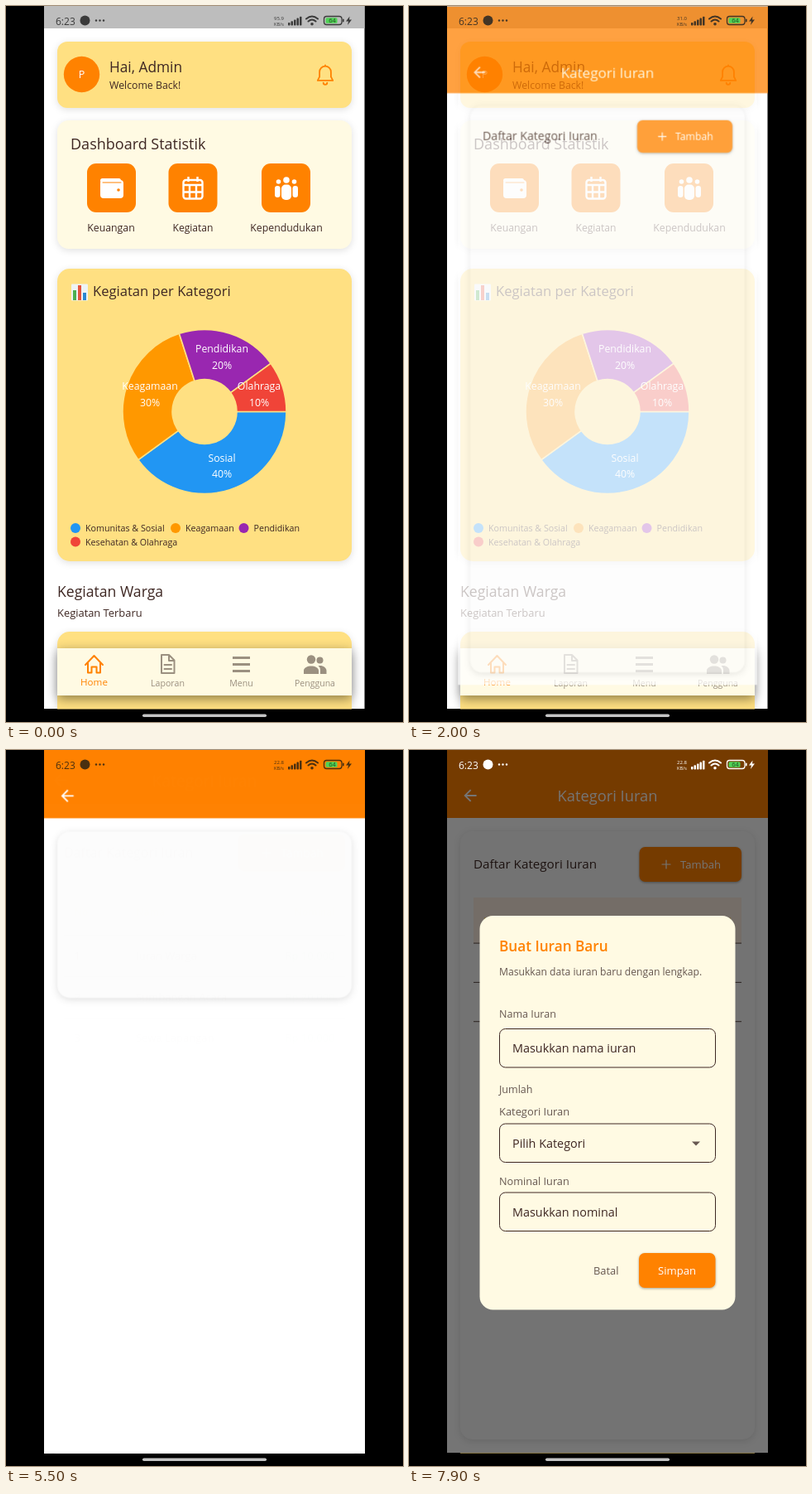
An HTML page that plays this animation: 480x864 px, repeating every 8000 ms.

```html
<!DOCTYPE html>
<html lang="id">
<head>
<meta charset="utf-8">
<title>Kategori Iuran</title>
<style>
html, body { margin: 0; width: 100%; height: 100%; overflow: hidden; background: #000; }
svg { display: block; width: 480px; height: 864px; font-family: "Open Sans", "Noto Sans", sans-serif; }
.soft { filter: drop-shadow(0 2px 4px rgba(0,0,0,.12)); }
.lift { filter: drop-shadow(0 1px 1.5px rgba(0,0,0,.35)); }
.deep { filter: drop-shadow(0 4px 7px rgba(0,0,0,.45)); }
.anim { animation: 8s linear infinite both; }
.zoom { transform-origin: 240px 424px; }

#menuScrim { animation-name: menuScrim; }
#sheet { animation-name: sheet; }
#list { animation-name: list; }
#rows { animation-name: rows; }
#press1 { animation-name: press1; }
#press3 { animation-name: press3; }
#detail { animation-name: detail; }
#dialogScrim { animation-name: dialogScrim; }
#dialog { animation-name: dialog; }
#status { animation-name: status; }
#rate0 { animation-name: rate0; }
#rate1 { animation-name: rate1; }
#rate2 { animation-name: rate2; }

@keyframes menuScrim {
  0%, 2.5% { opacity: 0; }
  6.5%, 19.4% { opacity: .28; }
  23%, 100% { opacity: 0; }
}
@keyframes sheet {
  0%, 2.5% { transform: translateY(660px); animation-timing-function: cubic-bezier(0,0,.2,1); }
  8.85%, 19.4% { transform: none; animation-timing-function: cubic-bezier(.4,0,1,1); }
  23%, 100% { transform: translateY(660px); }
}
@keyframes list {
  0%, 23.75% { opacity: 0; transform: scale(.85); animation-timing-function: ease-out; }
  26% { opacity: 1; transform: scale(.96); animation-timing-function: ease-out; }
  29.5%, 65% { opacity: 1; transform: scale(1); animation-timing-function: ease-out; }
  69%, 78% { opacity: 1; transform: scale(1.05); animation-timing-function: ease-out; }
  80% { opacity: 1; transform: scale(1.0127); animation-timing-function: ease-out; }
  83%, 100% { opacity: 1; transform: scale(1); }
}
@keyframes rows { 0%, 34% { opacity: 0; } 37.5%, 100% { opacity: 1; } }
@keyframes press1 {
  0%, 62.5% { opacity: 0; }
  64.5%, 81% { opacity: 1; }
  86%, 100% { opacity: 0; }
}
@keyframes press3 {
  0%, 49.5% { opacity: 0; }
  52%, 55% { opacity: 1; }
  58%, 100% { opacity: 0; }
}
@keyframes detail {
  0%, 65% { opacity: 0; transform: scale(.85); animation-timing-function: ease-out; }
  69%, 78% { opacity: 1; transform: scale(1); animation-timing-function: ease-out; }
  79.6%, 100% { opacity: 0; transform: scale(.94); }
}
@keyframes dialogScrim { 0%, 91.5% { opacity: 0; } 95.5%, 100% { opacity: .54; } }
@keyframes dialog { 0%, 92% { opacity: 0; } 95.5%, 100% { opacity: 1; } }
@keyframes status {
  0%, 24% { color: #3b3b3b; }
  26%, 92% { color: #4b3010; }
  95%, 100% { color: #fff; }
}
@keyframes rate0 { 0%, 3.7% { opacity: 1; } 3.71%, 100% { opacity: 0; } }
@keyframes rate1 { 0%, 3.7% { opacity: 0; } 3.71%, 52.4% { opacity: 1; } 52.41%, 100% { opacity: 0; } }
@keyframes rate2 { 0%, 52.4% { opacity: 0; } 52.41%, 100% { opacity: 1; } }
</style>
</head>
<body>
<svg id="stage" viewBox="0 0 480 864"></svg>
<script>
const ORANGE = '#ff8200', GOLD = '#ffe082', CREAM = '#fffae3', BROWN = '#3e2723', GREEN = '#2f8f36';

const text = (x, y, size, str, fill = BROWN, anchor = 'start', more = '') =>
  `<text x="${x}" y="${y}" font-size="${size}" fill="${fill}" text-anchor="${anchor}" ${more}>${str.replace('&', '&amp;')}</text>`;
const mid = (x, y, size, str, fill) => text(x, y, size, str, fill, 'middle');
const rect = (x, y, w, h, r, fill, more = '') =>
  `<rect x="${x}" y="${y}" width="${w}" height="${h}" rx="${r}" fill="${fill}" ${more}/>`;
const dot = (x, y, r, fill) => `<circle cx="${x}" cy="${y}" r="${r}" fill="${fill}"/>`;
// Icons live on a 24-unit grid centred on (x, y).
const icon = (x, y, s, body, fill = ORANGE) =>
  `<g transform="translate(${x - 12 * s} ${y - 12 * s}) scale(${s})" fill="${fill}">${body}</g>`;
const path = (d, more = '') => `<path d="${d}" ${more}/>`;
const line = (d, color, w) =>
  path(d, `fill="none" stroke="${color}" stroke-width="${w}" stroke-linecap="round" stroke-linejoin="round"`);
const layer = (id, body, cls = '') => `<g id="${id}" class="anim ${cls}">${body}</g>`;
const soft = 'class="soft"', lift = 'class="lift"';

const addPerson = path('M13 8c0-2.21-1.79-4-4-4S5 5.79 5 8s1.79 4 4 4 4-1.79 4-4zm2 2v2h3v3h2v-3h3v-2h-3V7h-2v3h-3zM1 18v2h16v-2c0-2.66-5.33-4-8-4s-8 1.34-8 4z');
const icons = {
  grid: path('M3 13h8V3H3v10zm0 8h8v-6H3v6zm10 0h8V11h-8v10zm0-18v6h8V3h-8z'),
  note: path('M17 10H7v2h10v-2zm2-7h-1V1h-2v2H8V1H6v2H5c-1.1 0-2 .9-2 2v14c0 1.1.9 2 2 2h14c1.1 0 2-.9 2-2V5c0-1.1-.9-2-2-2zm0 16H5V8h14v11zm-5-5H7v2h7v-2z'),
  houses: path('M1 11v10h5v-6h4v6h5V11L8 6zM10 3v2l7 5v1h2v2h-2v2h2v2h-2v4h6V3H10zm9 6h-2V7h2v2z'),
  purse: path('M21 18v1c0 1.1-.9 2-2 2H5c-1.1 0-2-.9-2-2V5c0-1.1.9-2 2-2h14c1.1 0 2 .9 2 2v1h-9c-1.1 0-2 .9-2 2v8c0 1.1.9 2 2 2h9zm-9-2h10V8H12v8zm4-2.5c-.83 0-1.5-.67-1.5-1.5s.67-1.5 1.5-1.5 1.5.67 1.5 1.5-.67 1.5-1.5 1.5z'),
  coin: dot(12, 12, 10, ORANGE) +
    line('M15.4 9.2C15.2 7.7 14 6.7 12 6.7 10 6.7 8.7 7.7 8.7 9.2 8.7 12.6 15.6 11.1 15.6 14.8 15.6 16.4 14.2 17.4 12 17.4 9.8 17.4 8.5 16.3 8.3 14.7M12 4.8V6.5M12 17.6V19.2', CREAM, 2),
  chart: path('M19 3H5c-1.1 0-2 .9-2 2v14c0 1.1.9 2 2 2h14c1.1 0 2-.9 2-2V5c0-1.1-.9-2-2-2zM9 17H7v-7h2v7zm4 0h-2V7h2v10zm4 0h-2v-4h2v4z'),
  horn: path('M18 11v2h4v-2zM16 17.6l3.2 2.4 1.2-1.6-3.2-2.4zM20.4 5.6 19.2 4 16 6.4 17.2 8zM4 9c-1.1 0-2 .9-2 2v2c0 1.1.9 2 2 2h1v4h2v-4h1l5 3V6L8 9zm11.5 3c0-1.33-.58-2.53-1.5-3.35v6.69c.92-.81 1.5-2 1.5-3.34z'),
  bubble: path('M20 2H4c-1.1 0-2 .9-2 2v18l4-4h14c1.1 0 2-.9 2-2V4c0-1.1-.9-2-2-2z'),
  addPerson,
  accounts: path('M4 6H2v14c0 1.1.9 2 2 2h14v-2H4V6zm16-4H8c-1.1 0-2 .9-2 2v12c0 1.1.9 2 2 2h12c1.1 0 2-.9 2-2V4c0-1.1-.9-2-2-2zm-6 2c1.66 0 3 1.34 3 3s-1.34 3-3 3-3-1.34-3-3 1.34-3 3-3zm6 12H8v-1.5c0-2 4-3 6-3s6 1 6 3V16z'),
  history: path('M13 3c-4.97 0-9 4.03-9 9H1l3.9 4L9 12H6c0-3.87 3.13-7 7-7s7 3.13 7 7-3.13 7-7 7c-1.93 0-3.68-.79-4.94-2.06l-1.42 1.42C8.27 20 10.51 21 13 21c4.97 0 9-4.03 9-9s-4.03-9-9-9zm-1 5v5l4.28 2.54.72-1.21-3.5-2.08V8H12z'),
  manage: dot(10, 8, 4, ORANGE) +
    path('M10.7 13C7.8 12.9 5.3 13.7 3.4 14.8 2.5 15.3 2 16.3 2 17.4V20h9.3C9.7 17.8 9.6 15.2 10.7 13z') +
    `<g fill="none" stroke="${ORANGE}"><circle cx="17" cy="16" r="2.8" stroke-width="2"/><circle cx="17" cy="16" r="4.3" stroke-width="1.6" stroke-dasharray="2.2 2.3"/></g>`,
  card: rect(2, 4, 20, 16, 3.5, ORANGE) + line('M3.5 8.2H20.5', CREAM, 1.2) +
    line('M3 11.2H8.5C10 14 13 14.6 15 13.2L21 10.6', CREAM, 1.2),
};

function home() {
  const slice = (from, to, fill) => {
    const at = (deg, r) => {
      const a = deg * Math.PI / 180;
      return `${240 + r * Math.cos(a)} ${489.5 + r * Math.sin(a)}`;
    };
    return path(`M${at(from, 99)}A99 99 0 0 1 ${at(to, 99)}L${at(to, 39)}A39 39 0 0 0 ${at(from, 39)}Z`,
      `fill="${fill}" stroke="${GOLD}" stroke-width="1.6"`);
  };
  const blue = '#2196f3', amber = '#ff9800', purple = '#9927b0', red = '#f04438', grey = '#9b9080';
  const label = (x, y, name, pct) => mid(x, y, 12.3, name, '#fff') + mid(x, y + 19.7, 12.3, pct, '#fff');
  const key = (x, y, name, fill) => dot(x, y, 6, fill) + text(x + 12, y + 4, 10.7, name);
  const person = (x, y, h) => dot(x, y, h, '#fff');
  return rect(46, 0, 388, 848, 0, '#fff') + rect(46, 0, 388, 27, 0, '#bdbdbd')
    + rect(62, 43, 356, 80, 12, GOLD, soft) + dot(91.5, 82.5, 21.7, ORANGE) + mid(91.5, 87, 12.5, 'P', '#fff')
    + text(125, 80, 17.3, 'Hai, Admin') + text(125, 100, 12.3, 'Welcome Back!')
    + icon(386, 83, 1.15, line('M12 3a6 6 0 0 0-6 6v5l-2 4h16l-2-4V9a6 6 0 0 0-6-6zM12 2V3M10 20.3a2 2 0 0 0 4 0', ORANGE, 1.6))
    + rect(62, 138, 356, 155, 14, CREAM, soft) + text(78, 173, 18, 'Dashboard Statistik')
    + [98, 196.5, 309].map(x => rect(x, 190, 59, 59, 11, ORANGE)).join('')
    + rect(114, 208, 25, 5, 2.5, '#fff') + rect(114, 210, 28, 22, 4, '#fff') + line('M117 213H139', ORANGE, 1) + dot(136, 222, 1.8, ORANGE)
    + `<g fill="none" stroke="#fff" stroke-width="2.4">${rect(214.5, 210, 23, 22.5, 3, 'none')}<path d="M214 216H238M214 224.5H238M222 216V232M230 216V232M220.5 206V212M231.5 206V212"/></g>`
    + person(339, 210, 3.8) + person(329.5, 212, 2.8) + person(348.5, 212, 2.8)
    + rect(333, 215.5, 12, 18.5, 5, '#fff') + rect(325, 217, 6.5, 14, 3.2, '#fff') + rect(346.5, 217, 6.5, 14, 3.2, '#fff')
    + mid(127, 272, 12.3, 'Keuangan') + mid(226, 272, 12.1, 'Kegiatan') + mid(339, 272, 12.3, 'Kependudukan')
    + rect(62, 317, 356, 353, 15, GOLD, soft)
    + rect(79, 335.5, 20, 20, 1, '#eef3f5') + rect(81, 343, 4, 12, 0, '#4caf50') + rect(87, 337, 4, 18, 0, '#e5533d') + rect(93, 346, 4, 9, 0, '#2b87d1')
    + text(105, 350, 16.6, 'Kegiatan per Kategori')
    + slice(0, 144, blue) + slice(144, 252, amber) + slice(252, 324, purple) + slice(324, 360, red)
    + label(261, 549.5, 'Sosial', '40%') + label(174, 463, 'Keagamaan', '30%')
    + label(261, 418.3, 'Pendidikan', '20%') + label(306, 463, 'Olahraga', '10%')
    + key(84, 630, 'Komunitas & Sosial', blue) + key(205, 630, 'Keagamaan', amber)
    + key(287.5, 630, 'Pendidikan', purple) + key(84, 646.5, 'Kesehatan & Olahraga', red)
    + text(62, 713, 17.6, 'Kegiatan Warga') + text(62, 737, 12.9, 'Kegiatan Terbaru')
    + rect(62, 755, 356, 120, 15, GOLD, soft) + rect(62, 775, 356, 57, 0, CREAM, 'class="deep"')
    + line('M96 795 106.500 784 117 795M99 793V804.500H103.500V797.500H109.500V804.500H114V793', ORANGE, 2)
    + line('M188 783H197L203.500 789.500V805H188ZM197 783V790H203M191.500 795H200M191.500 800H200', grey, 2)
    + path('M274 786.500H295M274 794.500H295M274 802.500H295', `stroke="${grey}" stroke-width="2.800"`)
    + dot(369, 788.5, 5.2, grey) + dot(379.5, 789.5, 4, grey)
    + path('M360 806V802C360 794.500 378 794.500 378 802V806ZM380 806V801.500C380 799 379 797.500 377.500 796.300 382 795 387.500 798 387.500 802V806Z', `fill="${grey}"`)
    + mid(106.5, 820, 11.6, 'Home', ORANGE) + mid(195.5, 821, 10.6, 'Laporan', grey)
    + mid(284.5, 821, 10.6, 'Menu', grey) + mid(373.5, 821, 10.5, 'Pengguna', grey);
}

function sheet() {
  const items = [
    ['grid', 'Dashboard'], ['note', 'Kegiatan'], ['houses', 'Data Warga &', 'Rumah'],
    ['purse', 'Pemasukan'], ['coin', 'Pengeluaran'], ['chart', 'Laporan', 'Keuangan'],
    ['horn', 'Broadcast'], ['bubble', 'Pesan Warga'], ['addPerson', 'Penerimaan', 'Warga'],
    ['accounts', 'Mutasi Keluarga'], ['history', 'Log Aktifitas'], ['manage', 'Manajemen', 'Pengguna'],
    ['card', 'Channel', 'Transfer'], ['addPerson', 'Aspirasi'],
  ];
  const tiles = items.map(([name, first, second], i) => {
    const x = 81.5 + i % 3 * 111, y = 210.5 + Math.floor(i / 3) * 121.4, cx = x + 47.7;
    const up = second ? 9.5 : 0;
    return rect(x, y, 95.5, 105.5, 11, CREAM, soft) + icon(cx, y + 37 - up, 1.5, icons[name])
      + mid(cx, y + 80.8 - up, 12.3, first) + (second ? mid(cx, y + 90.8, 12.3, second) : '');
  });
  return rect(62, 190.5, 356, 630.5, 22, '#fff') + tiles.join('');
}

const pageTop = rect(46, 0, 388, 848, 0, '#fff') + rect(0, -30, 480, 112, 0, ORANGE)
  + icon(74, 55, .95, path('M20 11H7.800l5.600-5.600L12 4l-8 8 8 8 1.400-1.400L7.800 13H20z'), '#fff');

function list() {
  const rows = [['Iuran Warga', '10.000'], ['Sumbangan Acara', '20.000'], ['Sewa Lapangan', '10.000']];
  const row = ([name, sum], i) => {
    const y = 261 + i * 47.3;
    return text(90, y, 12.4, `${i + 1}`) + text(161, y, 12.4, name) + text(390, y, 12.4, `Rp ${sum}`, GREEN, 'end');
  };
  const press = i => layer('press' + (i + 1), rect(78, 233 + i * 47.3, 324, 47.3, 0, '#efeeed'));
  return pageTop + mid(240, 62, 18.3, 'Kategori Iuran', '#fff')
    + rect(62, 98, 356, 734, 15, '#fcfcfc', soft) + text(78, 143, 15.2, 'Daftar Kategori Iuran')
    + rect(278.5, 117, 123.5, 42, 7, ORANGE, lift) + line('M306 138H316M311 133V143', '#fff', 1.2)
    + text(328, 143, 13.1, 'Tambah', '#fff')
    + layer('rows', press(0) + press(2)
      + rect(78, 178, 324, 55, 0, '#fdeee2')
      + text(90, 210, 11.5, 'No', GOLD, 'start', 'font-weight="600"') + text(161, 210, 11.5, 'Nama', GOLD, 'start', 'font-weight="600"')
      + text(390, 210, 11.3, 'Nominal', GOLD, 'end', 'font-weight="600"')
      + [0, 1, 2].map(i => rect(78, 232.6 + i * 47.3, 324, 1, 0, '#5d4a45')).join('')
      + rows.map(row).join(''));
}

function dialog() {
  const soil = '#665750';
  const field = (y, hint) => rect(109.5, y, 261, 46.5, 7, 'none', `stroke="${BROWN}"`) + text(125, y + 28.5, 14.4, hint);
  return rect(85.5, 200, 309, 475.5, 16, CREAM)
    + text(109, 242.5, 17.2, 'Buat Iuran Baru', ORANGE, 'start', 'font-weight="600"')
    + text(109, 271.5, 12.15, 'Masukkan data iuran baru dengan lengkap.', soil)
    + text(109, 323, 12.5, 'Nama Iuran', soil) + field(336.5, 'Masukkan nama iuran')
    + text(109, 414, 12.5, 'Jumlah', soil) + text(109, 441, 12.9, 'Kategori Iuran', soil)
    + field(451, 'Pilih Kategori') + path('M342 472.500H352L347 477.500Z', `fill="${soil}"`)
    + text(109, 524.5, 12.7, 'Nominal Iuran', soil) + field(534, 'Masukkan nominal')
    + text(223, 633, 12.9, 'Batal', soil)
    + rect(278, 607, 92.5, 42, 7, ORANGE, lift) + text(301, 633, 13.1, 'Simpan', '#fff');
}

function status() {
  const ink = 'currentColor';
  const rate = (str, i) => layer('rate' + i, mid(330, 17, 6, str, ink));
  return text(60, 22.5, 12, '6:23', ink) + dot(95.5, 17.5, 6, ink)
    + [109, 113.5, 118].map(x => dot(x, 17.5, 1.2, ink)).join('')
    + ['95.9', '31.0', '22.8'].map(rate).join('') + mid(330, 24, 5.6, 'KB/s', ink)
    + [0, 1, 2, 3, 4].map(i => rect(341 + i * 3.5, 20 - i * 1.8, 2.5, 3.5 + i * 1.8, .8, ink)).join('')
    + line('M363 15.500Q370 9.500 377 15.500M365.500 18.500Q370 14.500 374.500 18.500', ink, 2) + dot(370, 21.8, 1.8, ink)
    + rect(384.5, 12.5, 21.5, 10, 3, 'none', 'stroke="currentColor" stroke-width="1.3"')
    + rect(386.5, 14.3, 14, 6.4, 1.5, '#4fd356') + mid(394.5, 20.3, 7.5, '64', '#234a20') + rect(407, 15.5, 1.6, 4, .8, ink)
    + path('M415.500 12.500 411 18.500H414L413 23 418 16.500H415Z', 'fill="currentColor"');
}

const scrim = id => layer(id, rect(46, 0, 388, 848, 0, '#000'));
document.getElementById('stage').innerHTML =
  `<clipPath id="phone">${rect(46, 0, 387.5, 848.5, 0, '#000')}</clipPath>`
  + rect(0, 0, 480, 864, 0, '#000')
  + `<g clip-path="url(#phone)">${home()}${scrim('menuScrim')}${layer('sheet', sheet())}`
  + layer('list', list(), 'zoom')
  + layer('detail', pageTop + rect(62, 98, 356, 201, 15, '#fcfcfc', soft), 'zoom')
  + scrim('dialogScrim') + layer('dialog', dialog()) + layer('status', status()) + '</g>'
  + rect(165, 854.5, 150, 3.5, 1.7, '#c4c4c4');
</script>
</body>
</html>
```
